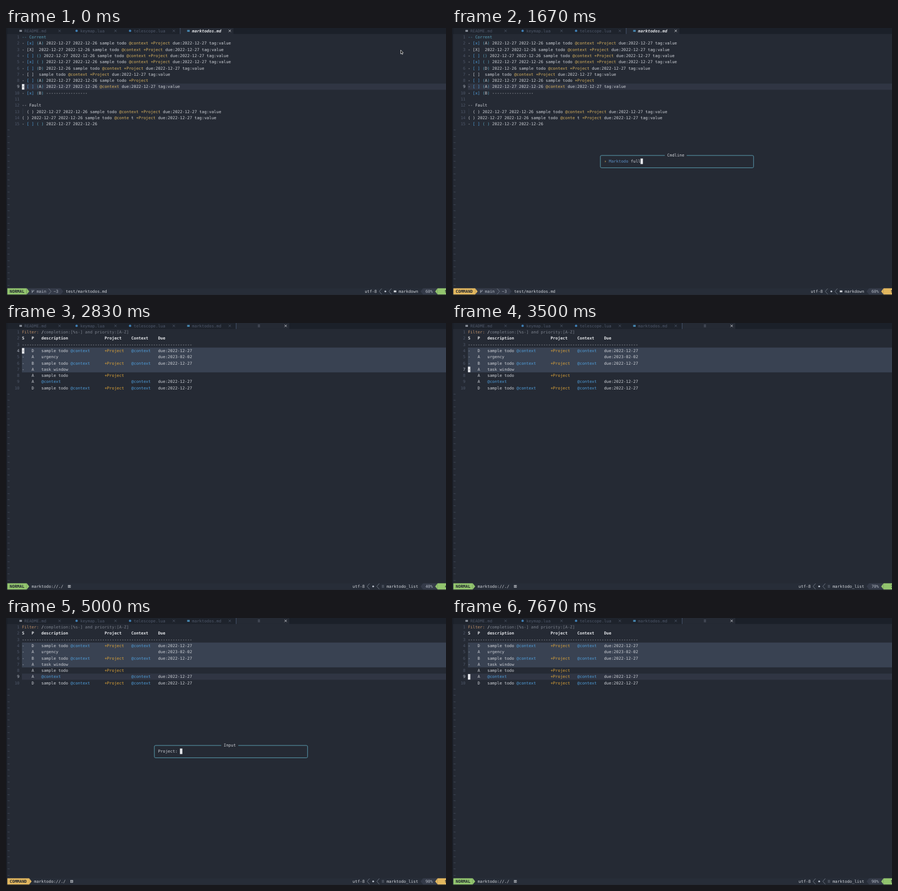
These frames come from a looping animation (800 by 486 pixels, 8000 ms). An HTML page with a canvas:

```html
<!DOCTYPE html>
<html lang="en">
<head>
<meta charset="utf-8">
<title>Todo editor</title>
<style>
  html, body { margin: 0; width: 100%; height: 100%; overflow: hidden; background: #252a34; }
  canvas { display: block; width: 800px; height: 486px; }
</style>
</head>
<body>
<canvas id="stage" width="800" height="486"></canvas>
<script>
const ctx = document.getElementById('stage').getContext('2d');
const LOOP = 8000, CW = 4.42, RH = 11.29, LEFT = 2.4, TOP = 10.85;
const FONT = '7.34px "DejaVu Sans Mono", "Noto Sans Mono", monospace';
const C = {
  bg: '#252a34', edge: '#1a1e26', bar: '#1b2029', tab: '#1e232c', line: '#303543', pick: '#394252',
  fg: '#cdd0d6', dim: '#4f586a', num: '#b4bac6', white: '#e4e6ea', blue: '#4f9edb', teal: '#5a9fb8',
  gold: '#d6b05e', amber: '#dba238', tan: '#b98d68', grey: '#7b818c', green: '#92c46e',
  yellow: '#e2b75f', section: '#353b49', dark: '#1f242d', border: '#5a9db0'
};

const X = col => LEFT + col * CW;
const Y = row => TOP + (row - 1) * RH;
const mid = row => Y(row) + RH / 2;

function box(x, y, w, h, color) {
  ctx.fillStyle = color;
  ctx.fillRect(x, y, w, h);
}

// Write on the terminal grid, one cell per character.
function put(row, col, text, color = C.fg, style = '') {
  ctx.font = style + ' ' + FONT;
  ctx.fillStyle = color;
  for (const ch of text) {
    if (ch !== ' ') ctx.fillText(ch, X(col), mid(row) + 2.65);
    col++;
  }
}

function poly(points, color) {
  ctx.fillStyle = color;
  ctx.beginPath();
  points.forEach(([x, y]) => ctx.lineTo(x, y));
  ctx.fill();
}

function stroke(points, color, width = 0.8) {
  ctx.strokeStyle = color;
  ctx.lineWidth = width;
  ctx.beginPath();
  points.forEach(([x, y], i) => i ? ctx.lineTo(x, y) : ctx.moveTo(x, y));
  ctx.stroke();
}

function dot(row, col, color, r = 2.1) {
  ctx.fillStyle = color;
  ctx.beginPath();
  ctx.arc(X(col + 0.5), mid(row), r, 0, Math.PI * 2);
  ctx.fill();
}

function square(row, col, color) {
  box(X(col + 0.5) - 2.3, mid(row) - 1.7, 4.6, 3.4, color);
}

function cross(col, color) {
  const x = X(col + 0.5), y = mid(0), r = 2.1;
  stroke([[x - r, y - r], [x + r, y + r]], color);
  stroke([[x - r, y + r], [x + r, y - r]], color);
}

function sheet(row, col, color) {
  const x = X(col + 0.5), y = mid(row);
  for (const d of [-1.8, 0, 1.8]) stroke([[x - 2, y + d], [x + 2, y + d]], color, 0.7);
}

// Filled wedge, dir 1 points right and -1 left.
function wedge(col, dir, color) {
  const a = X(dir > 0 ? col : col + 1), b = a + dir * CW, y = Y(42);
  poly([[a, y], [b, y + RH / 2], [a, y + RH]], color);
}

function chevron(col, dir) {
  const a = X(dir > 0 ? col : col + 1), b = a + dir * CW, y = Y(42);
  stroke([[a, y + 0.5], [b, y + RH / 2], [a, y + RH - 0.5]], '#8d95a3', 0.7);
}

const block = (row, col) => box(X(col), Y(row) + 0.9, CW, RH - 1.2, C.white);

const TODOS = [
  '-- Corrent',
  '- [x] (A) 2022-12-27 2022-12-26 sample todo @context +Project due:2022-12-27 tag:value',
  '- [X]  2022-12-27 2022-12-26 sample todo @context +Project due:2022-12-27 tag:value',
  '- [ ] () 2022-12-27 2022-12-26 sample todo @context +Project due:2022-12-27 tag:value',
  '- [x] ( ) 2022-12-27 2022-12-26 sample todo @context +Project due:2022-12-27 tag:value',
  '- [ ] (D) 2022-12-26 sample todo @context +Project due:2022-12-27 tag:value',
  '- [ ]  sample todo @context +Project due:2022-12-27 tag:value',
  '- [ ] (A) 2022-12-27 2022-12-26 sample todo +Project',
  '- [ ] (A) 2022-12-27 2022-12-26 @context due:2022-12-27 tag:value',
  '- [x] (B) -----------------',
  '',
  '-- Fault',
  '  ( ) 2022-12-27 2022-12-26 sample todo @context +Project due:2022-12-27 tag:value',
  '( ) 2022-12-27 2022-12-26 sample todo @conte t +Project due:2022-12-27 tag:value',
  '- [ ] ( ) 2022-12-27 2022-12-26'
];

// state, priority, description, project, context, due
const TASKS = [
  ['-', 'D', 'sample todo @context', '+Project', '@context', 'due:2022-12-27'],
  ['-', 'A', 'urgency', '', '', 'due:2023-02-02'],
  ['-', 'B', 'sample todo @context', '+Project', '@context', 'due:2022-12-27'],
  ['-', 'A', 'task window', '', '', ''],
  ['', 'A', 'sample todo', '+Project', '', ''],
  ['', 'A', '@context', '', '@context', 'due:2022-12-27'],
  ['', 'D', 'sample todo @context', '+Project', '@context', 'due:2022-12-27']
];
const COLS = [6, 10, 14, 40, 51, 62];
const HEADS = ['S', 'P', 'description', 'Project', 'Context', 'Due'];

// Base text first, then recolour matching parts.
function putMarked(row, col, text, rules) {
  const colors = Array(text.length).fill(C.fg);
  for (const [re, color] of rules)
    for (const m of text.matchAll(re)) colors.fill(color, m.index, m.index + m[0].length);
  [...text].forEach((ch, i) => put(row, col + i, ch, colors[i]));
}

function gutter(count, current) {
  for (let n = 1; n <= 41; n++) {
    if (n > count) put(n, 0, '~', C.dim);
    else put(n, 5 - String(n).length, String(n), n === current ? C.num : C.dim);
  }
}

function drawTodos(cursor) {
  box(X(6), Y(9), 800, RH, C.line);
  gutter(TODOS.length, 9);
  TODOS.forEach((text, i) => {
    const rules = [[/[@+]\w+/g, C.gold]];
    if (/^- \[.\] \(/.test(text)) rules.push([/\[.\]/g, C.blue], [/[()]/g, C.teal]);
    if (i === 0) rules.push([/.+/g, C.teal]);
    putMarked(i + 1, 6, text, rules);
  });
  stroke([[X(6.4), Y(13)], [X(6.4), Y(14)]], '#3a414f', 0.6);
  if (cursor) {
    block(9, 6);
    put(9, 6, '-', C.dark);
  }
}

function drawTasks(row, cursor, added) {
  box(X(6), Y(4), 800, RH * 4, C.pick);
  if (row > 7) box(X(6), Y(row), 800, RH, C.line);
  gutter(10, row);
  put(1, 6, 'Filter:', C.tan);
  put(1, 14, '/', C.fg);
  put(1, 15, 'completion:[%s-] and priority:[A-Z]', C.grey);
  HEADS.forEach((h, i) => put(2, COLS[i], h, C.white, 'bold'));
  put(3, 6, '-'.repeat(70));
  TASKS.forEach((task, i) => {
    const n = i + 4;
    task.forEach((text, k) => {
      if (n === 9 && k === 3 && added) text = '+Project';
      putMarked(n, COLS[k], text, [[/@\w+/g, C.blue], [/\+\w+/g, C.amber]]);
    });
  });
  if (cursor) {
    block(row, 6);
    put(row, 6, TASKS[row - 4][0], C.dark);
  }
}

function drawTabs(list) {
  box(0, 0, 800, TOP, C.bar);
  box(LEFT, 0, X(list ? 94 : 71) - LEFT, TOP, C.tab);
  const [from, to] = list ? [94, 116] : [71, 93];
  box(X(from), 0, X(to) - X(from), TOP, C.bg);
  box(X(from), 0, 1, TOP, '#46536c');
  square(0, 5, '#8a909b');
  put(0, 7, 'README.md', C.dim);
  dot(0, 28, '#3f7fb5');
  put(0, 30, 'keymap.lua', C.dim);
  dot(0, 50, '#3f7fb5');
  put(0, 52, 'telescope.lua', C.dim);
  square(0, 74, '#4787b0');
  put(0, 76, 'marktodos.md', list ? C.dim : C.white, list ? '' : 'italic bold');
  for (const c of [21, 44, 68]) cross(c, C.dim);
  cross(91, list ? C.dim : C.white);
  if (list) {
    sheet(0, 103, '#6a7281');
    cross(114, C.white);
  }
}

function branch(col) {
  const x = X(col + 0.5), y = mid(42), c = '#b3b9c4';
  stroke([[x - 1.3, y - 2.6], [x - 1.3, y + 2.8]], c, 0.9);
  stroke([[x + 1.6, y - 2.6], [x + 1.6, y - 0.6], [x - 1.3, y + 1]], c, 0.9);
}

function drawStatus({ list, command, git, row, lines }) {
  const tone = command ? C.yellow : C.green, mode = command ? 'COMMAND' : 'NORMAL';
  let c = mode.length + 2;
  box(LEFT, Y(42), 800, RH, '#272d38');
  box(LEFT, Y(42), X(c) - LEFT, RH, tone);
  put(42, 1, mode, C.dark, 'bold');
  const b = !list ? 14 : git ? 5 : 0;
  if (b) {
    box(X(c), Y(42), b * CW, RH, C.section);
    wedge(c + b, 1, C.section);
  }
  wedge(c, 1, tone);
  if (!list) {
    branch(c + 2);
    put(42, c + 4, 'main', '#b3b9c4');
    chevron(c + 9, 1);
    put(42, c + 11, '~3', '#b3b9c4');
  } else if (git) {
    put(42, c + 2, '~3', '#b3b9c4');
  }
  c += b + 2;
  const name = list ? 'marktodo://./' : 'test/marktodos.md';
  put(42, c, name);
  if (list) {
    const x = X(c + name.length + 2.5), y = mid(42);
    ctx.strokeStyle = C.fg;
    ctx.lineWidth = 0.8;
    ctx.strokeRect(x - 2, y - 2, 4, 4);
    box(x - 0.9, y - 0.9, 1.8, 1.8, C.fg);
  }

  const type = list ? 'marktodo_list' : 'markdown', r = 169 - type.length;
  put(42, r, type);
  if (list) sheet(42, r - 2, '#747c8a');
  else square(42, r - 2, C.fg);
  chevron(r - 4, -1);
  dot(42, r - 6, '#b3b9c4', 1.7);
  chevron(r - 8, -1);
  put(42, r - 14, 'utf-8');
  wedge(170, -1, C.section);
  box(X(171), Y(42), CW * 6, RH, C.section);
  put(42, 172, Math.round(row / lines * 100) + '%', '#b3b9c4');
  wedge(176, -1, tone);
  box(X(177), Y(42), 30, RH, tone);
  put(42, 180, String(row), C.dark, 'bold');
}

function drawPopup(title, col) {
  const x = X(60.5), y = 232, w = X(123.5) - x, h = 22.4;
  ctx.strokeStyle = C.border;
  ctx.lineWidth = 1;
  ctx.beginPath();
  ctx.roundRect(x, y, w, h, 2);
  ctx.stroke();
  box(X(col - 1), y - 2, CW * (title.length + 2), 4, C.bg);
  put(20, col, title);
}

function drawPointer() {
  const arrow = [[717.6, 40], [717.6, 47.2], [719.3, 45.8], [720.4, 48.2],
    [721.4, 47.7], [720.4, 45.4], [722.4, 45.2], [717.6, 40]];
  poly(arrow, '#111');
  stroke(arrow, '#e8e8e8', 0.8);
}

const passed = (times, t) => times.filter(v => t >= v).length;
const MOVES = [3170, 3330, 3500, 3750, 3820];
const KEYS = [5660, 6580, 6740, 6920, 7000, 7080, 7250, 7330];

function draw(t) {
  const list = t >= 1745;
  const cmd = t >= 80 && !list;
  const input = t >= 4495 && t < 7495;
  const row = list ? 4 + passed(MOVES, t) : 9;

  box(0, 0, 800, 486, C.bg);
  drawTabs(list);
  if (list) drawTasks(row, !input, t >= 7495);
  else drawTodos(!cmd);
  drawStatus({ list, command: cmd || input, git: t < 1825, row, lines: list ? 10 : 15 });
  box(0, 0, 2, 486, C.edge);

  if (cmd) {
    const n = Math.min(13, Math.max(0, Math.floor((t - 80) / 64)));
    drawPopup('Cmdline', 88);
    put(21, 62, '›', C.yellow, 'bold');
    put(21, 64, 'Marktodo'.slice(0, n), '#5c8fc4');
    put(21, 72, ' full'.slice(0, Math.max(0, n - 8)));
    block(21, 64 + n);
  }
  if (input) {
    const n = passed(KEYS, t);
    drawPopup('Input', 89);
    put(21, 62, 'Project: ' + '+Project'.slice(0, n));
    block(21, 71 + n);
  }
  if (t < 80) drawPointer();
}

ctx.textRendering = 'geometricPrecision';
const start = performance.now();
function tick() {
  draw((performance.now() - start) % LOOP);
  requestAnimationFrame(tick);
}
tick();
</script>
</body>
</html>
```
